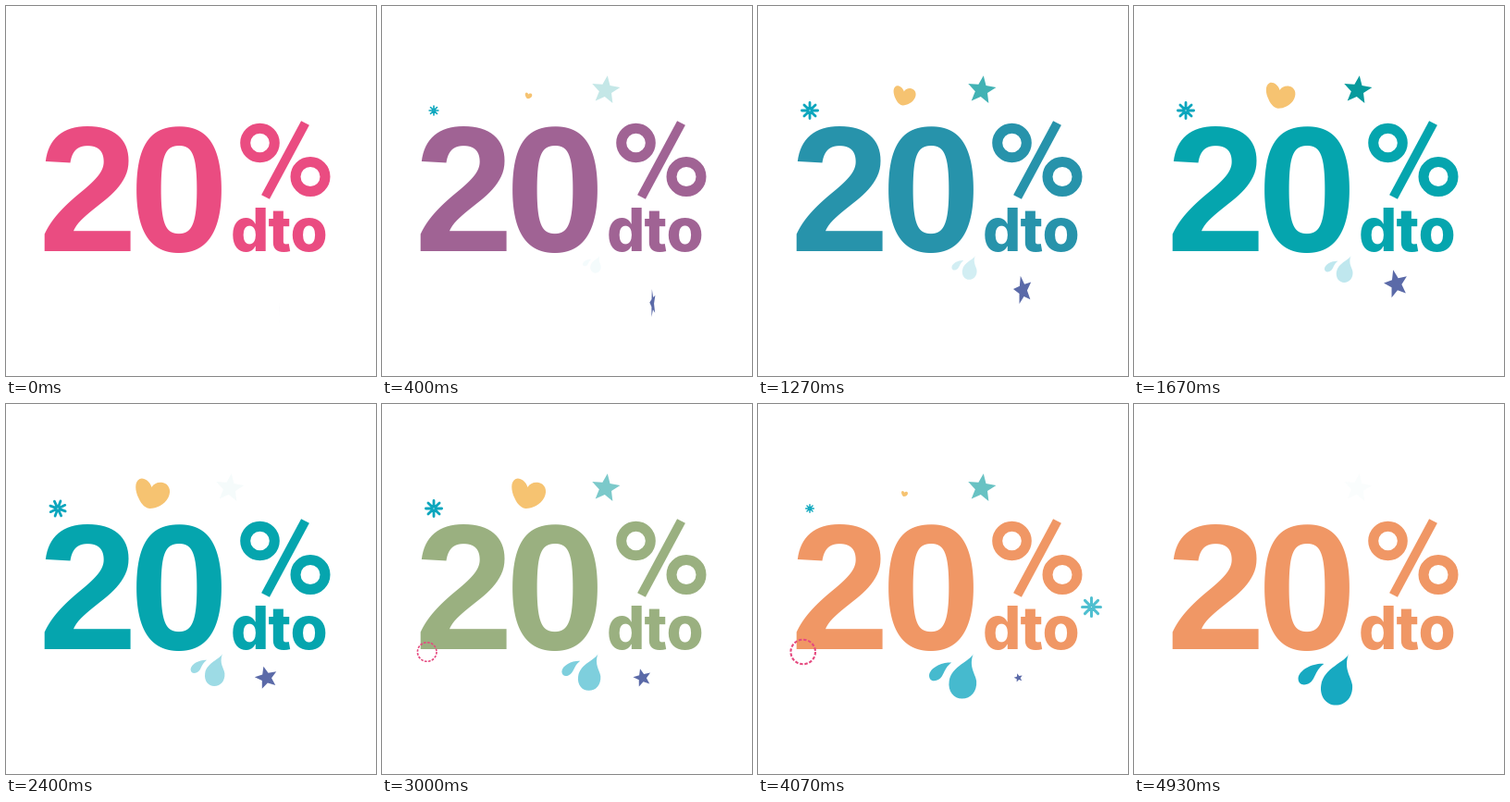
These frames come from a looping animation (400 px wide and 400 px high, 4.99 s). An HTML page with a canvas:

```html
<!DOCTYPE html>
<html lang="es">
<head>
<meta charset="utf-8">
<title>20% dto</title>
<style>
  html, body { margin: 0; width: 100%; height: 100%; overflow: hidden; background: #fff; }
  canvas { display: block; width: 400px; height: 400px; }
</style>
</head>
<body>
<canvas id="stage" width="400" height="400" role="img" aria-label="20% dto"></canvas>
<script>
const LOOP = 4990;
const ctx = document.getElementById('stage').getContext('2d');

// Pink, blue, teal, green, orange.
const PALETTE = [[234, 76, 129], [87, 121, 166], [5, 165, 174], [154, 176, 128], [240, 151, 101]];

const HEART = new Path2D(
  'M-1-7C-3-14-10-18-14-16C-20-13-19-3-15 5C-12 12-7 16-3 16' +
  'C4 16 13 12 17 4C21-4 17-11 11-12C6-13 1-11-1-7Z');
const DROPS = new Path2D(
  'M232 270C229 279 205 285 202 304C200 317 208 326 218 326C229 326 237 317 236 304' +
  'C235 295 226 287 232 270Z' +
  'M205 281C194 280 178 287 177 297C177 303 182 305 187 303C196 300 194 289 205 281Z');
const STAR = new Path2D();
for (let i = 0; i < 10; i++) {
  const r = i % 2 ? 7 : 16, a = i * Math.PI / 5 - Math.PI / 2;
  STAR.lineTo(r * Math.cos(a), r * Math.sin(a));
}
STAR.closePath();

// 0 before a, 1 after b, linear between.
const ramp = (t, a, b) => Math.min(1, Math.max(0, (t - a) / (b - a)));
// Rises from a to b, falls from c to d.
const swell = (t, a, b, c, d) => Math.min(ramp(t, a, b), 1 - ramp(t, c, d));

function paletteColor(step) {
  const i = Math.min(Math.floor(step), PALETTE.length - 2);
  const mix = PALETTE[i].map((v, k) => Math.round(v + (PALETTE[i + 1][k] - v) * (step - i)));
  return `rgb(${mix})`;
}

function at(x, y, sx, sy, alpha, draw) {
  if (!sx || !sy || alpha <= 0) return;
  ctx.save();
  ctx.translate(x, y);
  ctx.scale(sx, sy);
  ctx.globalAlpha = alpha;
  draw();
  ctx.restore();
}

function shape(path, color, turn = 0) {
  ctx.rotate(turn);
  ctx.fillStyle = color;
  ctx.fill(path);
}

function burst(r, width, color, turn = 0) {
  ctx.rotate(turn);
  ctx.strokeStyle = color;
  ctx.lineWidth = width;
  ctx.lineCap = 'round';
  ctx.beginPath();
  for (let i = 0; i < 8; i++) {
    const c = Math.cos(i * Math.PI / 4), s = Math.sin(i * Math.PI / 4);
    ctx.moveTo(2 * c, 2 * s);
    ctx.lineTo(r * c, r * s);
  }
  ctx.stroke();
}

function circle(x, y, r) {
  ctx.beginPath();
  ctx.arc(x, y, r, 0, 2 * Math.PI);
  ctx.stroke();
}

// Font whose sample letter has the given inked height.
function fitFont(weight, face, sample, height) {
  ctx.font = `${weight} 100px ${face}`;
  const m = ctx.measureText(sample);
  const size = 100 * height / (m.actualBoundingBoxAscent + m.actualBoundingBoxDescent);
  return `${weight} ${size}px ${face}`;
}
const DIGITS = fitFont(700, '"Liberation Sans", Arial, sans-serif', '0', 137);
const WORD = fitFont(800, 'Inter, sans-serif', 'd', 48);

// Centres the ink of each letter on its x.
function letters(font, text, centers, y) {
  ctx.font = font;
  [...text].forEach((ch, i) => {
    const m = ctx.measureText(ch);
    ctx.fillText(ch, centers[i] - (m.actualBoundingBoxRight - m.actualBoundingBoxLeft) / 2, y);
  });
}

function offer(color) {
  ctx.fillStyle = ctx.strokeStyle = color;
  letters(DIGITS, '20', [88, 187], 265.3);
  letters(WORD, 'dto', [263, 295.5, 327.5], 264.5);
  ctx.lineWidth = 11;
  circle(274.5, 148, 15.8);
  circle(329, 184.5, 16);
  ctx.lineWidth = 10;
  ctx.lineCap = 'butt';
  ctx.beginPath();
  ctx.moveTo(323.5, 126.5);
  ctx.lineTo(280.5, 206.5);
  ctx.stroke();
}

function render(t) {
  ctx.fillStyle = '#fff';
  ctx.fillRect(0, 0, 400, 400);
  offer(paletteColor(2 * ramp(t, 0, 1600) + 2 * ramp(t, 2400, 3600)));

  const heart = swell(t, 0, 1950, 3000, 4320);
  at(158.5, 97, heart, heart, 1, () => shape(HEART, '#f6c371'));

  const glow = swell(t, 0, 1670, 1670, 2430) + swell(t, 2430, 3500, 3500, 4960);
  at(241.7, 91, 1, 1, glow, () => shape(STAR, '#079a9c', .13));

  const size = swell(t, 0, 700, 3300, 4850);
  const turn = .35 * Math.sin(Math.PI * ramp(t, 1670, 3000));
  at(56, 113, size, size, 1, () => burst(8.6, 2.8, '#0ba6bd', turn));
  at(360.5, 219.5, 1, 1, swell(t, 3250, 3800, 3800, 4850), () => burst(10, 3, '#12a9bf'));

  // The lower star opens like a turning card while it rises, then shrinks.
  const rise = ramp(t, 0, 1950), flyer = Math.pow(1 - ramp(t, 1600, 4800), .8);
  at(295.5 - 14 * rise, 328 - 32 * rise, flyer * rise, flyer, 1,
    () => shape(STAR, '#5b6aa8', -.25));

  const p = t / LOOP, drop = .275 + .725 * p;
  at(237, 270, drop, drop, Math.pow(p, 1.2), () => {
    ctx.translate(-237, -270);
    shape(DROPS, '#14a8c1');
  });

  const ring = 1.13 * Math.sin(Math.PI * ramp(t, 2450, 4850));
  at(48.7, 268, ring, ring, 1, () => {
    const step = 2 * Math.PI * 13.8 / 16;
    ctx.strokeStyle = '#e5497f';
    ctx.lineWidth = 2.2;
    ctx.lineCap = 'butt';
    ctx.setLineDash([step * .66, step * .34]);
    circle(0, 0, 13.8);
  });
}

const start = performance.now();
function tick() {
  render((performance.now() - start) % LOOP);
  requestAnimationFrame(tick);
}
tick();
</script>
</body>
</html>
```
